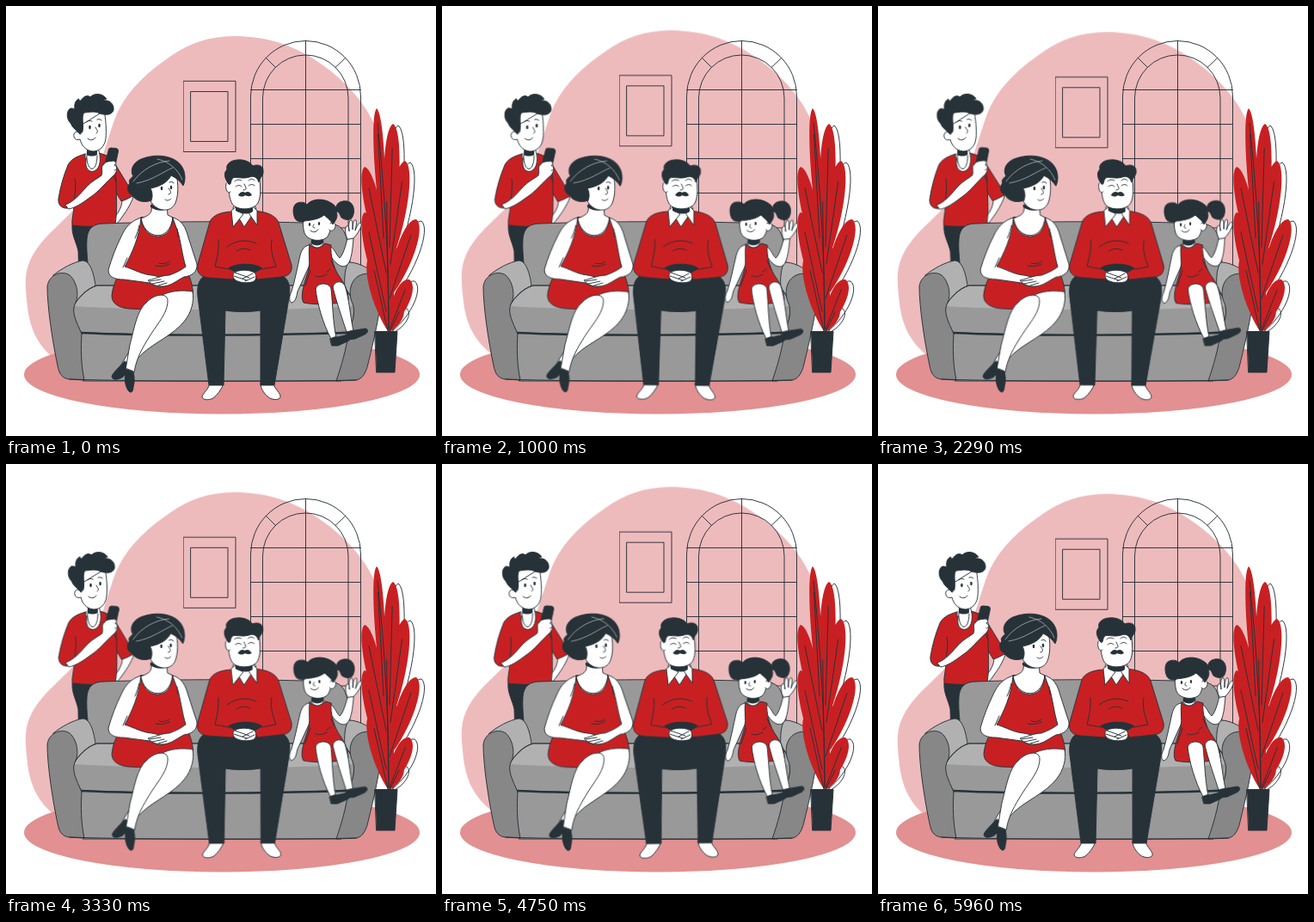
Animation, 500 px wide and 500 px high, one loop 6 s. Source, as an HTML page:

```html
<!DOCTYPE html>
<html lang="en">
<head>
<meta charset="utf-8">
<title>Family on a sofa</title>
<style>
html, body { margin: 0; width: 100%; height: 100%; overflow: hidden; background: #fff; }
svg { display: block; width: 100%; height: 100%; stroke: #263238; stroke-width: .95; stroke-linecap: round; stroke-linejoin: round; }
.r { fill: #c82022; }
.w { fill: #fff; }
.k { fill: #263238; }
.l { fill: none; }
.n { stroke: none; }
.g1 { fill: #878787; }
.g2 { fill: #999; }
.g3 { fill: #b1b1b1; }
.hair { fill: none; stroke: #bfc3c5; stroke-width: .7; }
</style>
</head>
<body>
<svg viewBox="0 0 500 500">
  <path id="blob" class="n" fill="#eebbbd" d="M265 35C236 35 212 44 192 58C165 76 143 97 131 121C118 147 114 190 81 234C62 256 40 270 28 296C20 313 23 331 25 351C28 374 36 394 56 410L400 400C434 345 448 270 440 180C437 155 427 130 413 112C398 91 378 74 352 58C328 44 300 35 265 35Z"/>

  <g id="window" class="l">
    <path d="M284.500 310V105A64 64.500 0 0 1 412.500 105V310M298.500 310V107A49.750 50 0 0 1 398 107V310M348.500 40.500V310"/>
    <path d="M284.500 97.500H412.500M284.500 137.500H412.500M284.500 177.500H412.500M284.500 217.500H412.500M284.500 258H412.500M302 60L313.500 71.500M395 60L383 71.500"/>
  </g>

  <g id="picture" class="l">
    <rect x="206.500" y="87.300" width="60.500" height="82.200"/>
    <rect x="215" y="99.500" width="43" height="58"/>
  </g>

  <ellipse class="n" fill="#e29091" cx="251" cy="428.500" rx="230" ry="46"/>

  <g id="boy">
    <path class="k" d="M77 255C76 266 82 275 84 285L85 320H128L130 250Z"/>
    <path class="w" d="M134 216L148 222C145 231 139 240 133 248C130 253 125 256 125 250C125 245 129 243 131 239C135 232 136 226 134 216Z"/>
    <path class="r" d="M107 171C117 173 124 177 127 184L149 220C144 223 138 226 134 227L122 207Z"/>
    <path class="r" d="M92 172C81 175 75 179 72 185C67 197 63 211 61 224C60 231 65 236 72 235L79 231C79 240 76 248 77 255C92 257 112 257 127 254C130 236 128 220 128 204L126 183C121 175 113 172 107 171C110 194 91 194 92 172Z"/>
    <path class="l" d="M80 201C82 208 80 216 79 231M128 204L124 195"/>
    <path class="w" d="M95 163L94 175C87 198 113 199 109 173L106 160Z"/>
    <path class="l" d="M94 177C95 194 106 194 106 174"/>
    <path class="k n" d="M94 165L106 163V173C102 175 97 175 94 173Z"/>
    <path class="w" d="M69 231C78 228 85 220 92 212C99 204 106 201 111 197C113 193 110 188 113 184L118 180L126 182C131 187 129 195 123 199C117 204 108 216 97 223C89 229 80 235 73 236Z"/>
    <path class="k" d="M119 168Q119 165 122 165L128 165.500Q131 166 130.500 169L127.500 183Q127 186 124 185L116 181Z"/>
    <path class="w" d="M113 185C116 180 120 181 125 180C128 181 129 184 126 185C130 187 129 191 126 191"/>
    <path class="w" d="M85 140L114 122C116 130 117 145 116 154C115 163 109 169 101 169C92 168 88 162 86 155C81 157 78 153 79 149C80 146 83 145 86 148Z"/>
    <path class="k" d="M86 149C83 145 77 142 75 136C71 133 70 124 73 121C74 118 78 119 80 120C79 114 81 109 85 108C84 110 86 110 87 110C90 105 95 103 98 106C102 101 112 101 117 108C115 108 114 109 114 110C120 109 126 114 125 121C123 128 113 127 107 124C100 122 95 124 91 124C87 128 91 138 89 146Z"/>
    <ellipse class="k n" cx="97.500" cy="141" rx="1.300" ry="2.200"/>
    <ellipse class="k n" cx="108.500" cy="139" rx="1.300" ry="2.200"/>
    <path class="l" d="M94 135C95 133 98 133 100 134M106 132C108 131 110 132 111 133M104 141C106 145 108 146 105 148M95 154C98 157 102 156 104 153"/>
  </g>

  <g id="sofa">
    <path class="g2" d="M100 330C96 312 93 287 94 271C95 258 102 253 114 253C195 250 300 250 376 253C389 254 394 260 397 274L404 330Z"/>
    <path class="g3" d="M55 313C65 305 78 298 89 296C98 296 102 311 104 325L80 350Z"/>
    <path class="g3" d="M437 318C427 308 412 298 399 298C394 302 393 318 394 330L405 352Z"/>
    <path class="g2" d="M84 379H402L390 436H90Z"/>
    <path class="g2" d="M78 350C83 340 94 328 106 325H388C397 328 404 341 405 351C405 362 402 374 397 379C300 384 180 383 88 380C82 374 77 360 78 350Z"/>
    <path class="g3 n" d="M79 349C84 340 95 329 106 325.500H388C396 329 402 340 404 349C330 355 150 354 79 349Z"/>
    <path class="l" d="M78 350C83 340 94 328 106 325H388C397 328 404 341 405 351"/>
    <path class="l" stroke-width="2.300" d="M87 380C170 384 310 383 398 380"/>
    <path class="g1" d="M88 381C82 368 76 356 80 347C86 336 82 320 74 313C65 307 50 312 48 326C48 350 54 390 60 418C62 429 66 433 74 434L91 435C87 416 87 398 88 381Z"/>
    <path class="g1" d="M398 379C403 368 407 356 403 346C397 333 401 319 410 314C420 308 436 312 437 324C437 350 428 387 421 416C418 429 413 434 407 435L384 436C390 418 396 399 398 379Z"/>
    <path class="l" d="M74 434C170 437 310 437 407 435"/>
  </g>

  <g id="mother">
    <path class="r" d="M157 246C154 263 146 280 138 296C132 311 124 323 123 337C123 346 131 351 143 352C171 354 198 350 217 340C219 328 214 316 209 304C206 290 204 266 194 246Z"/>
    <path class="w" d="M180 337C190 331 205 330 217 332C219 343 216 356 207 367C195 382 172 392 160 403C151 411 145 419 139 427L132 421C139 407 151 390 165 371Z"/>
    <path class="k" d="M138 413C133 419 124 426 123 431C124 436 131 434 135 432C140 428 143 422 143 417Z"/>
    <path class="w" d="M163 345C152 354 149 376 144 394L139 423L149 426C151 413 156 402 164 389C175 370 188 358 188 343C188 333 173 334 163 345Z"/>
    <path class="k" d="M140 422C137 431 138 441 142 447C145 451 148 449 148 443C150 436 149 430 148 425Z"/>
    <path class="w" d="M171 222L169 238C168 243 162 245 157 247C159 258 165 268 177 268C189 267 193 257 194 246L188 243L187 229Z"/>
    <path class="l" d="M157 247C160 270 190 277 194 246"/>
    <path class="k n" d="M168 231L187 233L187 236C181 239 174 238 168 234Z"/>
    <path class="w" d="M157 246C145 250 139 257 134 268C128 280 123 293 119 307C119 316 128 318 137 318L167 322C175 328 185 327 190 322C183 316 176 314 169 313C158 312 148 306 138 303C146 288 155 270 157 246Z"/>
    <path class="w" d="M194 246C205 249 209 258 212 269L222 300C223 309 216 314 207 315C199 319 195 323 188 325C178 328 169 324 165 319C174 317 182 313 190 313C198 310 204 307 209 303C205 290 203 273 200 263Z"/>
    <path class="l" d="M150 270C153 264 154 259 155 255M200 268L199 259M167 320L180 318M170 323L184 320M177 325L187 322M178 299C184 301 188 298 190 297M174 302C182 304 187 301 190 300M136 304L141 293"/>
    <path class="w" d="M163 200L197 191C200 203 201 216 198 226C195 238 184 239 176 235C169 231 164 222 164 211Z"/>
    <path class="k" d="M169 226C160 230 150 226 147 220C141 218 140 210 144 206C142 203 145 200 148 198C143 190 149 180 160 177C177 171 197 175 204 186C209 193 209 203 206 209C203 204 198 200 192 197C188 205 179 210 168 212C170 216 171 221 169 226Z"/>
    <path class="hair" d="M148 204C158 190 175 181 190 180M152 206C170 203 182 193 194 188M176 178C190 181 200 190 205 202"/>
    <ellipse class="k n" cx="181" cy="212" rx="1.300" ry="2.200"/>
    <ellipse class="k n" cx="192" cy="211" rx="1.300" ry="2.200"/>
    <path class="l" d="M177 207C179 204 182 205 183 206M190 205C192 204 194 204 195 206M189 212C192 216 193 218 189 219M185 225C187 227 190 226 192 224"/>
  </g>

  <g id="father">
    <path class="w" d="M237 438L253 439C251 445 246 452 241 456C235 459 228 458 228 454C229 450 236 446 237 438Z"/>
    <path class="w" d="M296 439L311 438C312 446 320 450 319 455C317 459 308 458 304 454C300 450 296 445 296 439Z"/>
    <path class="k" d="M231 314C223 318 222 328 223 338L236 441H253L255 354C266 356 284 356 296 354L296 441H312L329 340C331 328 330 319 322 314L293 304H260Z"/>
    <path class="r" d="M265 239C251 239 240 243 237 251L223 300C221 310 226 315 235 316L264 318L268 309L259 305C268 299 289 299 298 305L288 310L292 318L320 315C330 314 333 309 332 301L317 252C313 242 301 239 287 238Z"/>
    <path class="k n" d="M258 305C267 298 290 298 298 305L290 310H267Z"/>
    <path class="l" d="M247 272C248 284 245 294 243 303L259 306M309 272C307 285 311 294 314 303L298 306M257 280C268 272 280 271 291 276M268 285C273 282 278 281 284 284"/>
    <path class="w" d="M267 309C274 306 284 307 289 310C292 314 291 320 286 321C278 323 268 321 265 317C263 313 264 310 267 309Z"/>
    <path class="l" d="M266 310L283 316M265 314L280 319M287 311L275 317M289 315L278 320"/>
    <path class="w" d="M267 229L264 235L277 257L291 236L287 228Z"/>
    <path class="w" d="M267 234L262 238L264 257L276 242L270 238ZM287 233L292 238L292 255L283 242Z"/>
    <path class="k n" d="M267 232H287V239C281 243 273 242 267 238Z"/>
    <path class="w" d="M260 199L294 196C296 209 297 221 293 229C288 238 268 238 263 230C259 223 259 213 259 208Z"/>
    <path class="w" d="M260 206C256 203 255 208 256 213C257 217 260 218 261 216"/>
    <path class="k" d="M259 207C255 202 252 195 257 190C255 184 262 179 269 179C276 178 284 181 287 186C294 183 300 187 299 192C300 197 295 199 294 205C292 199 288 197 283 199C273 202 266 197 263 201C261 204 262 209 259 207Z"/>
    <path class="k n" d="M270 220C272 216 276 215 278 217C281 215 284 216 286 220C283 222 280 221 278 220C276 222 273 222 270 220Z"/>
    <path class="l" d="M267 210C269 208 273 208 274 210M282 209C284 207 288 207 289 209M266 204C268 201 272 202 274 203M282 203C284 200 288 201 289 203M277 207C279 211 281 214 276 214"/>
  </g>

  <g id="girl">
    <path class="w" d="M354 278C347 278 344 283 342 290C339 303 336 319 332 332C329 337 329 344 332 345C337 344 338 337 339 332L354 299Z"/>
    <path class="w" d="M376 279C382 281 384 290 388 293C392 289 395 279 397 270L404 270C403 282 402 295 397 301C391 306 384 300 379 293Z"/>
    <path class="w" d="M397 271C394 265 394 258 396 256C398 254 399 258 399 262C398 255 399 249 401 249C403 248 403 254 403 260C403 253 405 247 407 249C408 252 407 257 406 261C408 256 411 250 413 253C414 257 409 265 404 270Z"/>
    <path class="r" d="M353 277C355 282 366 283 371 276L378 278C377 291 381 303 386 312C393 322 399 332 398 343C382 347 360 348 346 345C341 337 348 320 352 306C354 295 351 287 353 277Z"/>
    <path class="l" d="M348 325L354 307M382 305L378 296M360 314C365 316 370 314 373 312M377 306L373 309"/>
    <path class="w" d="M380 327C382 319 391 319 394 325C399 340 400 359 404 378L397 382C391 363 384 344 380 327Z"/>
    <path class="w" d="M360 329C362 321 376 321 378 329C380 347 380 367 384 386L378 387C368 368 362 346 360 329Z"/>
    <path class="k" d="M396 379C400 378 403 377 406 377L418 375C422 376 421 380 417 382L406 387L397 388Z"/>
    <path class="k" d="M377 387C380 386 382 384 385 385L398 382C402 383 402 388 397 390L386 395L379 395Z"/>
    <path class="w" d="M356 267L355 277C359 283 366 282 369 276L368 266Z"/>
    <path class="k n" d="M355 271H369V275C365 280 358 279 355 276Z"/>
    <path class="w" d="M346 244L378 241C379 252 378 265 372 270C363 275 350 272 347 264C345 258 345 250 346 244Z"/>
    <path class="w" d="M377 253C381 249 385 254 382 259C380 262 377 262 376 260"/>
    <path class="k" d="M346 251C343 251 338 251 336 247C333 241 333 231 339 229C344 227 349 229 350 231C355 224 369 223 378 229C382 231 384 234 384 236C383 229 390 226 397 227C405 229 406 239 403 245C401 250 394 249 390 246C388 243 388 239 384 239C387 246 382 251 380 254C378 249 374 247 370 243C364 248 355 249 347 250Z"/>
    <ellipse class="k n" cx="353" cy="254" rx="1.200" ry="1.900"/>
    <ellipse class="k n" cx="364" cy="253" rx="1.200" ry="1.900"/>
    <path class="l" d="M358 254C356 257 357 258 359 258M354 261C357 264 361 263 363 260"/>
  </g>

  <g id="plant">
    <path id="shade" class="w"/>
    <path id="leaves" class="r n"/>
    <path id="ribs" class="l"/>
    <path class="l" d="M445 380C445 330 444 250 432 136"/>
    <path class="k" d="M429 378.500H455L452 426H431Z"/>
  </g>
</svg>
<script>
const $ = id => document.getElementById(id);

// Leaf blade from a base point to its tip; w sets the fullness.
function leaf([bx, by, tx, ty, w]) {
  const dx = tx - bx, dy = ty - by, len = Math.hypot(dx, dy);
  const at = (k, s) => `${bx + dx * k - dy / len * s} ${by + dy * k + dx / len * s}`;
  return `M${bx} ${by}C${at(.4, w)} ${at(.95, w)} ${tx} ${ty}C${at(.95, -w)} ${at(.4, -w)} ${bx} ${by}Z`;
}

const leaves = [
  [439, 270, 431, 119, 8],
  [446, 280, 450, 137, 12],
  [447, 300, 464, 180, 13],
  [442, 310, 417, 187, 12],
  [445, 379, 442, 190, 15],
  [446, 340, 477, 248, 14],
  [442, 355, 417, 240, 12],
  [446, 376, 469, 318, 13],
  [444, 378, 424, 290, 13],
  [446, 379, 460, 350, 9]
];
const rightward = leaves.filter(([x, , tx]) => tx > x);
const rib = ([x, y, tx, ty]) => `M${x} ${y}L${x + (tx - x) * .8} ${y + (ty - y) * .8}`;

$('shade').setAttribute('d', rightward.map(([x, y, tx, ty, w]) => leaf([x + 4, y + 1, tx + 6, ty + 2, w])).join(''));
$('leaves').setAttribute('d', leaves.map(leaf).join(''));
$('ribs').setAttribute('d', leaves.map(rib).join(''));

const loop = (id, frames, duration) => $(id).animate(frames, { duration, iterations: Infinity, easing: 'linear' });

const float = [0, -10, 0].map(y => ({ transform: `translateY(${y}px)` }));
const sway = [[0, 0], [.25, 1], [.75, -1], [1, 0]].map(([offset, a]) => ({ offset, transform: `rotate(${a}deg)` }));

['blob', 'picture'].forEach(id => loop(id, float, 3000));
[
  ['boy', 98, 277, 3000],
  ['girl', 374, 310, 3000],
  ['mother', 171, 312, 6000],
  ['father', 277, 318, 6000]
].forEach(([id, x, y, time]) => {
  $(id).style.transformOrigin = `${x}px ${y}px`;
  loop(id, sway, time);
});
</script>
</body>
</html>
```
